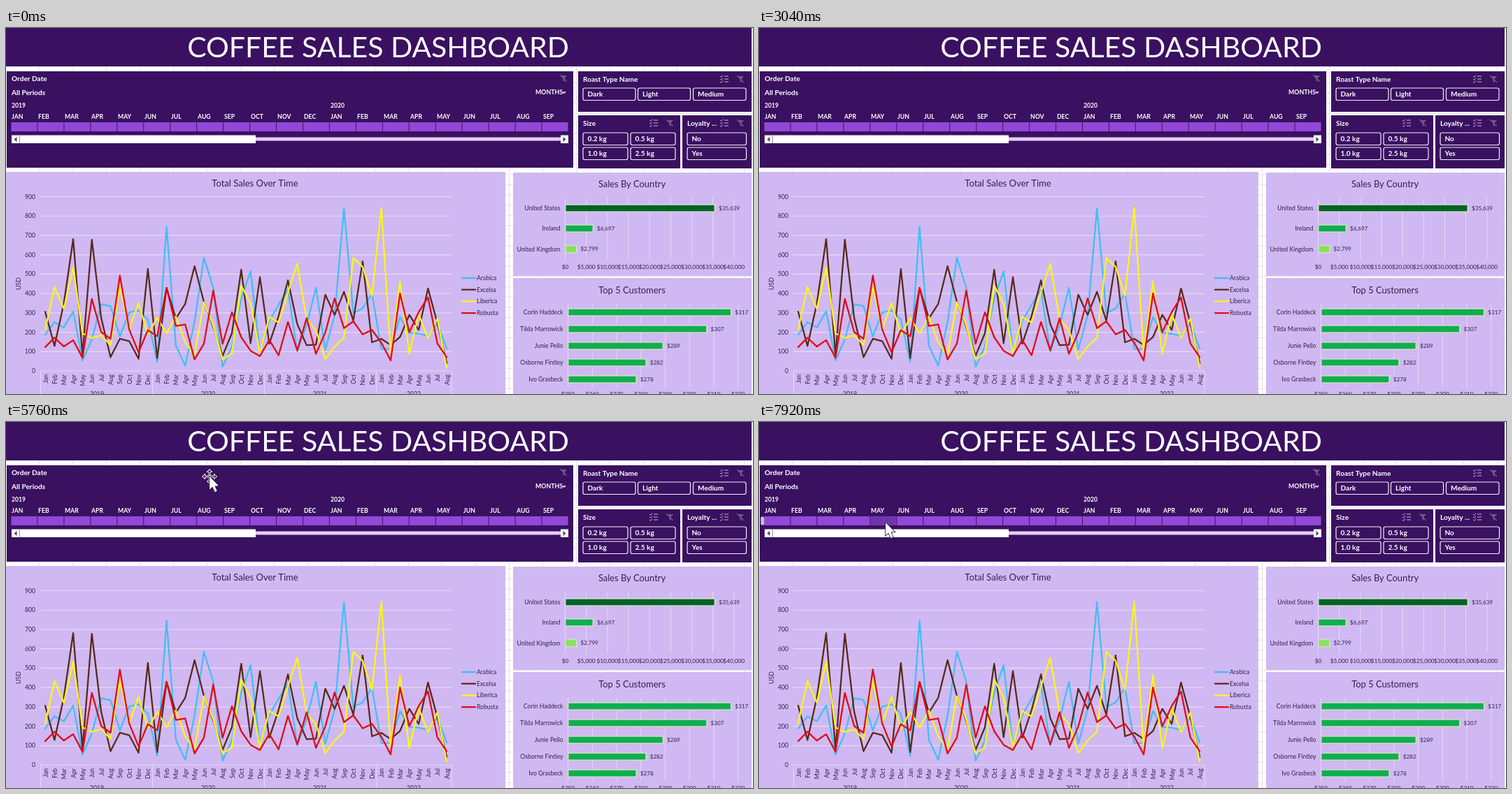
Write an HTML page with a canvas that moves like this. It is 1068 px wide and 524 px high and loops after 8000 ms.

```html
<!DOCTYPE html>
<html lang="en">
<head>
<meta charset="utf-8">
<title>Coffee Sales Dashboard</title>
<style>
html, body { margin: 0; width: 100%; height: 100%; overflow: hidden; background: #fff; }
canvas { display: block; }
</style>
</head>
<body>
<canvas id="stage" width="1068" height="524"></canvas>
<script>
const ctx = document.getElementById('stage').getContext('2d');
const LOOP = 8000, STEP = 80;
const DARK = '#3a1061', LILAC = '#d0b8f2', GRID = '#e6daf6', INK = '#35204f';
const MONTHS = ['Jan', 'Feb', 'Mar', 'Apr', 'May', 'Jun', 'Jul', 'Aug', 'Sep', 'Oct', 'Nov', 'Dec'];

const arabica = [187, 252, 225, 307, 54, 163, 345, 335, 179, 302, 313, 266,
  47, 745, 130, 27, 255, 585, 431, 22, 126, 376, 515, 96,
  258, 342, 418, 102, 235, 430, 110, 287, 841, 299, 323, 400,
  113, 114, 278, 197, 193, 180, 247, 116];
const excelsa = [306, 129, 349, 681, 83, 678, 274, 71, 166, 154, 63, 527,
  66, 429, 271, 347, 541, 357, 228, 78, 195, 523, 143, 485,
  140, 284, 468, 242, 133, 136, 394, 289, 409, 260, 566, 148,
  166, 134, 175, 290, 212, 426, 247, 41];
const liberica = [213, 434, 321, 534, 194, 171, 184, 134, 439, 216, 351, 187,
  275, 194, 281, 148, 83, 355, 236, 60, 89, 441, 347, 94,
  279, 251, 405, 554, 267, 210, 61, 126, 171, 584, 538, 388,
  844, 91, 463, 88, 293, 170, 271, 16];
const robusta = [123, 172, 126, 159, 68, 372, 201, 166, 493, 214, 96, 211,
  179, 430, 232, 240, 59, 141, 415, 140, 303, 174, 104, 77,
  160, 81, 253, 106, 273, 88, 199, 375, 221, 256, 189, 212,
  146, 54, 400, 200, 304, 380, 142, 71];

function rect(x1, y1, x2, y2, color) {
  ctx.fillStyle = color;
  ctx.fillRect(x1, y1, x2 - x1, y2 - y1);
}

function path(points, color, width = 1) {
  ctx.beginPath();
  points.forEach(([x, y]) => ctx.lineTo(x, y));
  ctx.strokeStyle = color;
  ctx.lineWidth = width;
  ctx.stroke();
}

function polygon(points, color) {
  ctx.beginPath();
  points.forEach(([x, y]) => ctx.lineTo(x, y));
  ctx.closePath();
  ctx.fillStyle = color;
  ctx.fill();
}

// y is the middle of the capital letters
function text(string, x, y, size, { color = INK, align = 'left', weight = 400 } = {}) {
  ctx.font = `${weight} ${size}px Lato, sans-serif`;
  ctx.textAlign = align;
  ctx.fillStyle = color;
  ctx.fillText(string, x, y + size * 0.36);
}

function uprightText(string, x, y, size, align) {
  ctx.save();
  ctx.translate(x, y);
  ctx.rotate(-Math.PI / 2);
  text(string, 0, 0, size, { align });
  ctx.restore();
}

const label = (string, x, y, size = 10.1) => text(string, x, y, size, { color: '#fff', weight: 700 });

function sheet() {
  rect(0, 0, 1068, 524, '#fff');
  for (let x = 47.5; x < 1068; x += 48) path([[x, 0], [x, 524]], '#e2e2e2');
  for (let y = 5.5; y < 524; y += 14.6) path([[0, y], [1068, y]], '#e2e2e2');
  rect(0, 0, 1066, 55, DARK);
  text('COFFEE SALES DASHBOARD', 532, 27, 41, { color: '#fff', align: 'center' });
}

function funnelIcon(x, y) {
  const color = '#6d5b82';
  polygon([[x - 4, y - 4], [x + 5, y - 4], [x + 1.5, y], [x + 1.5, y + 5], [x - 0.5, y + 4], [x - 0.5, y]], color);
  path([[x - 5, y - 5], [x + 5, y + 5]], color, 1.2);
}

function checklistIcon(x, y) {
  for (const dy of [-4, 0, 4]) {
    path([[x - 6, y + dy], [x - 4.5, y + dy + 1.5], [x - 2, y + dy - 1.5]], '#c4b6d4');
    path([[x, y + dy], [x + 6, y + dy]], '#c4b6d4');
  }
}

function slicer(title, x1, y1, x2, y2, buttons) {
  rect(x1, y1, x2, y2, DARK);
  label(title, x1 + 7, y1 + 11);
  checklistIcon(title === 'Size' ? 926 : 1027, y1 + 11);
  funnelIcon(title === 'Size' ? 949 : 1050, y1 + 11);
  for (const [name, x, y, width] of buttons) {
    ctx.beginPath();
    ctx.roundRect(x, y, width, 17.5, 2.5);
    ctx.strokeStyle = '#f4effa';
    ctx.lineWidth = 1.2;
    ctx.stroke();
    label(name, x + 6.5, y + 8.7);
  }
}

function slicers() {
  slicer('Roast Type Name', 818, 62, 1066, 120,
    [['Dark', 825, 86, 75], ['Light', 903.5, 86, 75], ['Medium', 982.5, 86, 75.5]]);
  slicer('Size', 818, 125, 964, 201,
    [['0.2 kg', 825, 150, 64], ['0.5 kg', 893, 150, 64], ['1.0 kg', 825, 171, 64], ['2.5 kg', 893, 171, 64]]);
  slicer('Loyalty ...', 967, 125, 1066, 201, [['No', 974, 150, 84.5], ['Yes', 974, 171, 84.5]]);
}

function timeline(hoverCell, showHandle) {
  rect(1, 62, 811, 200, DARK);
  label('Order Date', 8, 72);
  label('All Periods', 8, 92);
  funnelIcon(797, 72);
  label('MONTHS', 757, 92, 8.8);
  polygon([[795, 91], [801, 91], [798, 94.5]], '#cfc2dd');
  label('2019', 8, 111, 8.6);
  label('2020', 464, 111, 8.6);
  for (let i = 0; i < 21; i++) {
    const x = 7.5 + i * 37.95;
    label(MONTHS[i % 12].toUpperCase(), 8 + i * 38, 127, 8.7);
    rect(x, 135, x + 37, 148, '#9148d6');
    if (i === hoverCell) {
      rect(x, 135, x + 37, 148, '#7a3cba');
      for (let dy = 0; dy < 12; dy += 2)
        for (let dx = dy % 4 / 2; dx < 36; dx += 3) rect(x + dx, 136 + dy, x + dx + 1, 137 + dy, DARK);
    }
  }
  if (showHandle) {
    ctx.beginPath();
    ctx.roundRect(2.5, 135.5, 5, 12, 2);
    ctx.fillStyle = '#c9c1d2';
    ctx.fill();
  }
  rect(357, 156.5, 793, 161.5, '#e3cdf8');
  rect(8, 153.5, 357, 165, '#fff');
  rect(793, 153.5, 804, 165, '#fff');
  path([[19.5, 154], [19.5, 165]], '#9a8ca8');
  polygon([[15.5, 156], [15.5, 163], [11.5, 159.5]], '#4a4a4a');
  polygon([[796.5, 156], [796.5, 163], [800.5, 159.5]], '#4a4a4a');
}

function salesChart() {
  rect(0, 206, 714, 524, LILAC);
  text('Total Sales Over Time', 356, 222, 13, { align: 'center' });
  const yOf = value => 491 - value * 0.2772;
  const xOf = month => 56 + month * 13.35;
  for (let value = 0; value <= 900; value += 100) {
    path([[49, yOf(value)], [637, yOf(value)]], GRID, 1.2);
    text(value, 42, yOf(value), 8.6, { align: 'right' });
  }
  for (const x of [49.5, 209.5, 369.5, 529.5, 637]) path([[x, 491], [x, 524]], GRID);
  uprightText('USD', 18, 366, 8.8, 'center');
  for (let i = 0; i < 44; i++) uprightText(MONTHS[i % 12], xOf(i) + 0.5, 496, 8.6, 'right');
  [130, 289, 449, 583].forEach((x, i) => text(2019 + i, x, 524, 8.6, { align: 'center' }));

  const series = [['Arabica', '#45bdf5', arabica], ['Excelsa', '#582a1c', excelsa],
    ['Liberica', '#fbf51b', liberica], ['Robusta', '#e30b17', robusta]];
  ctx.lineJoin = ctx.lineCap = 'round';
  series.forEach(([name, color, values], i) => {
    const y = 358 + i * 16.7;
    path(values.map((value, month) => [xOf(month), yOf(value)]), color, 2.3);
    path([[652, y], [671, y]], color, 2.3);
    text(name, 673, y, 8.6);
  });
  ctx.lineJoin = 'miter';
  ctx.lineCap = 'butt';
}

function bar(name, value, x, end, y, color) {
  rect(x - 1, y - 6, end + 1.5, y + 6, '#cbdcc8');
  rect(x, y - 4.3, end - 0.5, y + 4.3, color);
  text(name, x - 8, y, 8.7, { align: 'right' });
  text(value, end + 6, y, 8.1);
}

function countryChart() {
  rect(725, 207, 1066, 355, LILAC);
  text('Sales By Country', 895, 223, 12.9, { align: 'center' });
  for (let i = 0; i <= 8; i++) {
    const x = 799.5 + i * 30.15;
    path([[x, 243], [x, 331]], GRID);
    text('$' + (i * 5000).toLocaleString('en-US'), x, 342, 8.3, { align: 'center' });
  }
  bar('United States', '$35,639', 800.5, 1013, 258, '#06602a');
  bar('Ireland', '$6,697', 800.5, 839, 287, '#12ad50');
  bar('United Kingdom', '$2,799', 800.5, 815.5, 316.5, '#8be05c');
}

function customerChart() {
  rect(725, 358, 1066, 524, LILAC);
  text('Top 5 Customers', 895, 375, 12.9, { align: 'center' });
  const xOf = value => 803.5 + (value - 250) * 3.475;
  for (let value = 250; value <= 320; value += 10) {
    path([[xOf(value), 395], [xOf(value), 514]], GRID);
    text('$' + value, xOf(value), 524, 8.1, { align: 'center' });
  }
  const customers = [['Corin Haddeck', 317], ['Tilda Marrowick', 307], ['Junie Pello', 289],
    ['Osborne Fintley', 282], ['Ivo Grasbeck', 278]];
  customers.forEach(([name, value], i) =>
    bar(name, '$' + value, 804.5, xOf(value), 407 + i * 24, '#12ad50'));
}

// time, x, y of the pointer tip
const route = [[4160, 690, 530], [4720, 558, 177], [4880, 558, 177], [5760, 291, 78],
  [6640, 285, 114], [7520, 239, 183], [7920, 181, 144], [8000, 181, 144]];

function pointerAt(time) {
  const next = route.findIndex(stop => stop[0] > time);
  if (next < 1) return null;
  const [t0, x0, y0] = route[next - 1], [t1, x1, y1] = route[next];
  const part = (time - t0) / (t1 - t0);
  const eased = part * part * (3 - 2 * part);
  return { x: x0 + (x1 - x0) * eased, y: y0 + (y1 - y0) * eased };
}

function moveIcon() {
  for (let i = 0; i < 4; i++) {
    path([[0, 0], [0, -7]], '#fff', 3);
    polygon([[-4.5, -6], [0, -11], [4.5, -6]], '#fff');
    path([[0, 0], [0, -7]], '#1c0c2c', 1);
    polygon([[-2.5, -6.8], [0, -9.5], [2.5, -6.8]], '#1c0c2c');
    ctx.rotate(Math.PI / 2);
  }
}

function pointer({ x, y }) {
  const arrow = [[0, 0], [0, 18.5], [4.3, 14.8], [7.6, 22.2], [10.7, 20.8], [7.5, 13.6], [13, 13.3], [0, 0]];
  ctx.save();
  ctx.translate(x, y);
  if (y > 62 && y < 105) moveIcon();
  path(arrow, '#24103a', 1.6);
  polygon(arrow, '#fff');
  ctx.restore();
}

function draw(time) {
  const tip = pointerAt(time);
  const overCells = tip && tip.y > 135 && tip.y < 148;
  sheet();
  timeline(overCells ? Math.floor((tip.x - 7.5) / 37.95) : -1, time >= 6400);
  slicers();
  salesChart();
  countryChart();
  customerChart();
  if (tip) pointer(tip);
}

function tick() {
  draw(Math.floor(performance.now() % LOOP / STEP) * STEP);
  requestAnimationFrame(tick);
}
tick();
</script>
</body>
</html>
```
